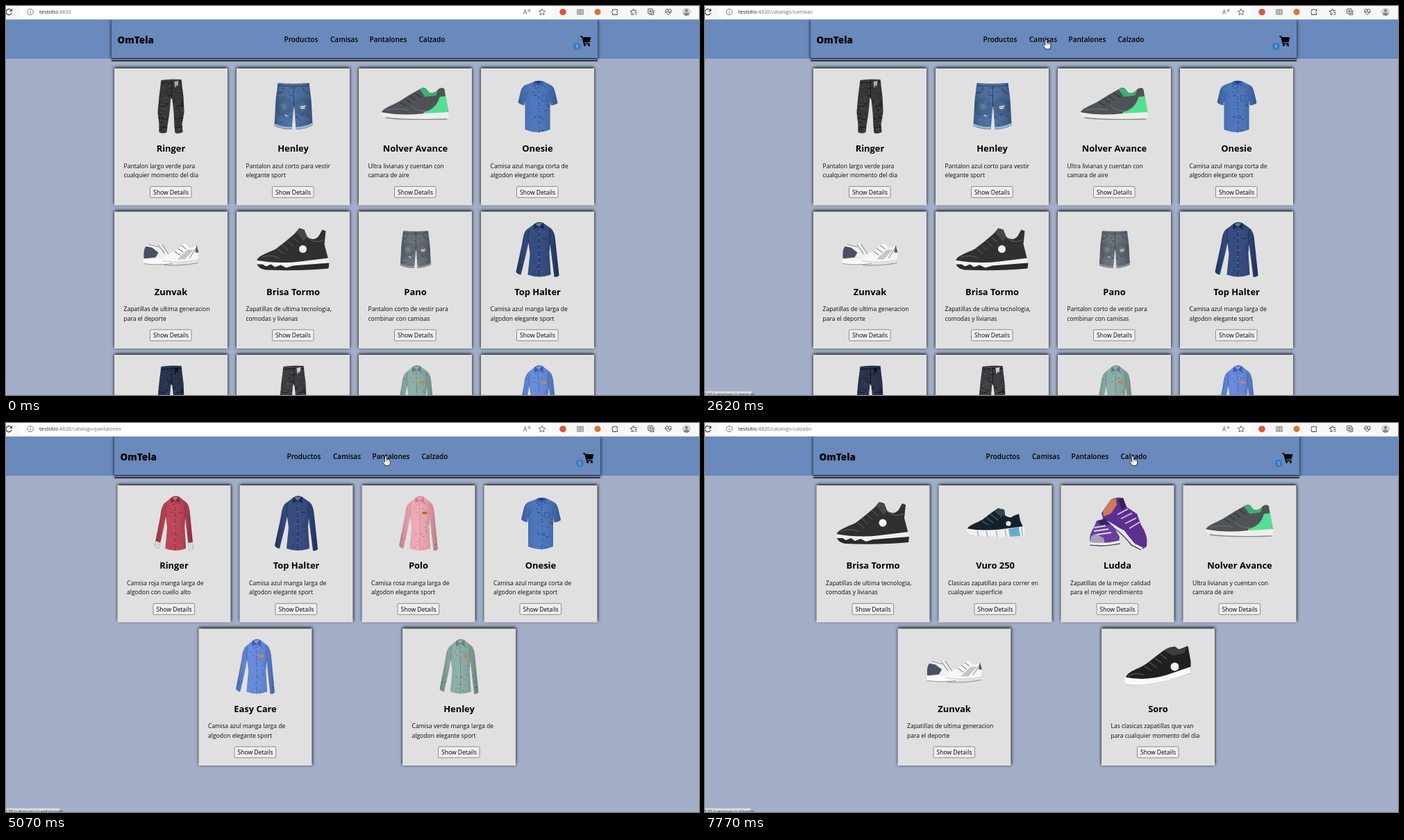
An HTML page with a canvas for the animation above (8 s loop, 998 by 561 pixels).

```html
<!DOCTYPE html>
<html lang="es">
<head>
<meta charset="utf-8">
<style>
html, body { margin: 0; width: 100%; height: 100%; overflow: hidden; background: #a3afc8; }
canvas { display: block; width: 998px; height: 561px; }
</style>
</head>
<body>
<canvas id="stage"></canvas>
<script>
const W = 998, H = 561, LOOP = 8000;
const dpr = window.devicePixelRatio || 1;
const SANS = '"Open Sans", "Noto Sans", sans-serif';
const BODY = `8.55px ${SANS}`, TITLE = `bold 12.9px ${SANS}`, URLFONT = `7.3px ${SANS}`;
const stage = document.getElementById('stage');
let g;

function prepare(canvas) {
  canvas.width = W * dpr;
  canvas.height = H * dpr;
  const c = canvas.getContext('2d');
  c.scale(dpr, dpr);
  return c;
}

function text(s, x, y, font, color = '#0b0b0b', align = 'left') {
  g.font = font;
  g.fillStyle = color;
  g.textAlign = align;
  g.fillText(s, x, y);
  return g.measureText(s).width;
}

function rect(x, y, w, h, color) {
  g.fillStyle = color;
  g.fillRect(x, y, w, h);
}

function fill(d, color) {
  g.fillStyle = color;
  g.fill(new Path2D(d));
}

function line(d, color, width = 1) {
  g.strokeStyle = color;
  g.lineWidth = width;
  g.stroke(new Path2D(d));
}

function dot(x, y, r, color) {
  g.fillStyle = color;
  g.beginPath();
  g.arc(x, y, r, 0, 7);
  g.fill();
}

function at(x, y, draw, sx = 1, sy = sx) {
  g.save();
  g.translate(x, y);
  g.scale(sx, sy);
  draw();
  g.restore();
}

function glow(x, y, r, color) {
  const soft = g.createRadialGradient(x, y, 0, x, y, r);
  soft.addColorStop(0, color);
  soft.addColorStop(1, 'transparent');
  rect(x - r, y - r, 2 * r, 2 * r, soft);
}

// Cloth: base colour, seeded light and dark flecks and a soft side shadow, clipped to the outline.
function cloth(d, base, fleck, count = 90, size = 3) {
  let seed = 7;
  const rnd = () => (seed = (seed * 16807) % 2147483647) / 2147483647;
  fill(d, base);
  g.save();
  g.clip(new Path2D(d));
  g.globalAlpha = 0.35;
  for (let i = 0; i < count; i++) {
    const color = i % 3 ? fleck : '#000';
    rect(rnd() * 68 - 34, rnd() * 82 - 41, size * (0.4 + rnd()), size * 0.5, color);
  }
  g.globalAlpha = 1;
  const shade = g.createLinearGradient(-30, 0, 30, 0);
  shade.addColorStop(0, 'rgba(0,0,0,.22)');
  shade.addColorStop(0.45, 'rgba(255,255,255,.07)');
  shade.addColorStop(1, 'rgba(0,0,0,.25)');
  rect(-40, -45, 80, 90, shade);
  g.restore();
}

const PANTS = 'M-14-38Q0-40 15-39L18-14 19 8 16 26 17 37Q11 40 6 38L5 28 4 8 2-10 0-13-2 8-5 28-6 37Q-11 40-17 37L-17 26-19 8-17-14Z';
const SHORTS = 'M-22-34Q0-32 23-34L26-10 28 27Q17 33 4 33L2 4 1 0-2 33Q-16 33-27 28L-25-10Z';
const TEE = 'M-7-35Q0-39 9-36L17-32Q23-30 25-22L29-5Q24-1 19-2L18-9 18 33Q0 41-18 33L-18-9-19-2Q-24-2-28-6L-24-23Q-22-30-15-32Z';
const SHIRT = 'M-5-37Q2-42 9-38L19-31Q25-27 26-10L31 37Q28 40 24 39L18-8 17 5 19 36Q2 42-14 36L-11 6-13-10-17 8-24 36Q-28 36-31 32L-22-10Q-20-28-13-31Z';

const pants = (base, fleck, tag = '#a9abb0') => () => {
  cloth(PANTS, base, fleck, 260, 4);
  line('M-15-34Q0-36 16-35M1-36 1-12M-18-2-8 0M8 0 18-2M-18 16-6 19M5 19 18 16M-17 29-5 31M6 31 17 29', 'rgba(0,0,0,.55)', 1);
  fill('M5-36 11-37 10-29 8-31 6-26Z', tag);
};

const shorts = (base, fade, cuff, tag, s = 1) => () => at(0, 0, () => {
  cloth(SHORTS, base, fade, 130, 3);
  g.save();
  g.clip(new Path2D(SHORTS));
  g.globalAlpha = 0.6;
  glow(-13, 0, 15, fade);
  glow(14, 0, 15, fade);
  g.restore();
  line('M-27 26Q-16 31-2 31M4 31Q17 31 28 25', cuff, 3);
  line('M-22-30Q0-28 23-30M1-29V0M-23-20Q-14-18-13-28M24-20Q16-18 14-28', 'rgba(15,25,50,.55)', 1);
  line('M10 1 18-1M11 3 17 2M-12 12-8 14', '#dde4ee', 1.3);
  fill('M-2-33H3V-30H-2Z', tag);
}, s);

function placket(color) {
  line('M1-32Q3 0 2 38', color, 0.9);
  for (let y = -26; y < 36; y += 9) dot(2, y, 0.6, '#d9dde8');
}

const tee = () => {
  cloth(TEE, '#3f6cba', '#5784cd', 90);
  placket('#2d539b');
  fill('M-7-35Q0-39 9-36L8-28 1-32-6-28Z', '#3562ad');
  fill('M-4-36Q1-38 6-36L1-32Z', '#233f78');
  line('M-18-8-15-22M18-8 16-22M6-16H13V-8H6Z', '#2f569d', 0.8);
};

const shirt = (base, fleck, dark, { cuff, label, w = 0.9 } = {}) => () => at(0, 0, () => {
  cloth(SHIRT, base, fleck, 150, 2);
  line('M-13-10Q-15-22-12-29M18-8Q17-22 18-29M7-16H14', dark, 0.9);
  placket(dark);
  fill('M-5-37Q2-42 9-38L9-29 2-33-5-29Z', dark);
  fill('M-3-37Q2-40 7-38L2-33Z', 'rgba(235,235,245,.4)');
  if (cuff) fill('M-29 25-22 28-24 36Q-28 36-31 32ZM22 28 30 27 31 37Q28 40 24 39Z', cuff);
  if (label) rect(6, -17, 8, 3.5, label);
}, w, 1);

const runner = () => {
  fill('M-49 9C-47 2-34-1-24-7L-8-17 8-26Q13-29 16-25L20-20Q28-18 33-25 39-29 42-25L44-12 48 9 0 15Z', '#4f5357');
  fill('M12 8Q30 4 35-14L44-15 48 10 12 12Z', '#55df92');
  fill('M6-25Q12-29 16-25L20-20Q28-18 33-25L30-16 14-14Z', '#3fae78');
  line('M-22-6-13-1M-15-11-6-5M-8-15 1-9M-1-20 9-13', '#2f3438', 1.3);
  line('M-42 5Q-22 2-10 5M-6-2Q2 8 16 6', '#73777b', 1);
  fill('M-50 8Q-20 14 12 10L48 8Q49 14 46 18 10 20-38 18-48 15-50 8Z', '#eeeeec');
  line('M-43 16Q-15 20 46 18', '#85888a', 1.3);
};

const highTop = () => {
  fill('M-53 17C-51 8-37 5-25-1L-11-12 2-23 9-31 16-29 20-19Q30-11 37-20L42-29 47-27 45-8 51 15 0 22Z', '#303033');
  fill('M4-25 9-31 16-29 20-19 16-12Z', '#47474b');
  line('M-22-1-13 6M-16-7-7 1M-9-13 0-5M-2-19 8-11M-46 11Q-32 6-20 12M20-18Q30-8 44-14', '#626267', 1);
  dot(14, -1, 5.5, '#f2f2f2');
  fill('M-54 15Q-20 21 10 17L51 12 52 21Q10 28-44 24-54 21-54 15Z', '#f0f0f0');
  fill('M-52 21-44 21-39 24-32 21-26 25-18 22-10 26 0 23 52 19 51 27Q10 31-40 29-50 27-52 21Z', '#2a2a2c');
};

const pairLow = () => {
  fill('M-39 16C-40 0-37-9-32-9L-22-7-15-10-10-5 3 9 3 18Z', '#efefef');
  fill('M-39 13Q-40 0-36-5L-27-3-18 4-22 11Z', '#4b5061');
  line('M-19-8-9 6M-13-8-2 8M-33-8-18-4', '#858994', 1.2);
  fill('M-40 13 3 14 2 20Q-22 23-39 20Z', '#fafafa');
  line('M-39 20Q-20 23 2 20', '#90939a', 1);
  fill('M-12 16C-11 8 4 3 12-3L20-9 25-4Q32-1 37-7L40 4 38 17-8 20Z', '#f7f7f7');
  fill('M9 14 24 0 33 0 20 14Z', '#c3c5ca');
  line('M5 2 13 8M10-2 18 4M15-6 22-1M27 12 36-2', '#888b95', 1.1);
  fill('M37-7 40 4 35 4Z', '#565a66');
  line('M-12 16Q10 20 39 15', '#c2c4c8', 1);
  line('M-10 22Q14 24 39 19', '#8d9097', 1.1);
};

const trainer = () => {
  fill('M-41 9C-39 2-28 0-18-6L-5-16 4-22 13-20 14-12Q21-6 26-11L34-14 36-4 41 7 0 13Z', '#17212c');
  line('M-19-4-9 3M-13-9-3-1M-7-14 4-5M0-18 9-10', '#3b6170', 1.4);
  fill('M4-22 13-20 14-12 9-11 0-18Z', '#30454f');
  dot(19, 0, 3.6, '#e9edf0');
  fill('M-42 7Q-15 12 18 7L41 4 43 16 30 19Q-8 20-34 16-42 14-42 7Z', '#f0f0f0');
  fill('M19 8 34 5 36 18 21 19Z', '#6aa9cf');
  line('M-26 10-24 18M-13 11-11 19M1 10 3 19M14 9 16 19M38 6 39 17', '#a3abb5', 1.4);
};

const purplePair = () => {
  fill('M-23-15-10-34Q-2-39 8-37L13-24 28-14 34 2Q45 18 42 33L36 37 24 30 10 10-6 2-20-4Z', '#5c2f8f');
  fill('M-21-17-10-34-2-36-1-27-9-15-20-10Z', '#cf7a59');
  fill('M1-34 8-37 13-24 6-19Z', '#372058');
  line('M0-13 15-21M5-7 21-15M11 0 27-8M17 7 32-2', '#d8c7ea', 1.8);
  line('M-19-4Q6 6 24 30L36 36', '#ece8f2', 2.6);
  line('M-14 2Q2 8 20 31L34 38', '#37264e', 1.3);
  fill('M-40 28Q-41 14-34 6L-30-4-19-7-6 4 3 19 2 28-30 31Z', '#66409b');
  fill('M-40 27Q-39 16-31 15L-20 21-18 29Z', '#a79dbd');
  fill('M-29-3-19-7-10 1-22 4Z', '#3b2460');
  line('M-33 6-17 3M-34 11-13 8M-30 16-9 13', '#e1d9ee', 1.8);
  line('M-40 28Q-22 32 3 26', '#f0eff3', 3);
  line('M-40 31Q-20 34 4 29', '#37264e', 1.2);
};

const lowSneaker = () => {
  fill('M-47 18C-46 6-28 4-16-5L2-19Q14-29 24-29L30-25 43-30 47-8 47 6-10 22Z', '#202022');
  fill('M8-23Q16-29 24-29L30-25 41-28 38-20 22-16Z', '#3e3e42');
  line('M-20-1-9 6M-13-7-2 1M-6-13 6-5M2-19 13-11M-43 14Q-32 7-21 12', '#56565b', 1.2);
  dot(24, 0, 6, '#f4f4f4');
  fill('M-48 15Q-18 21 12 12L47 0 47 9Q26 19-2 25-25 29-45 26-49 22-48 15Z', '#fafafa');
  line('M-46 26Q-5 30 47 9', '#bdbdbd', 0.9);
};

const algodon = 'algodon elegante sport', vestir = 'combinar con camisas';
const blueTee = ['Onesie', 'Camisa azul manga corta de', algodon, tee];
const navyShirt = ['Top Halter', 'Camisa azul manga larga de', algodon, shirt('#263f78', '#36528f', '#172b59', { w: 1 })];
const redShirt = ['Ringer', 'Camisa roja manga larga de', 'algodon con cuello alto', shirt('#b9384c', '#d66a78', '#8e2639', { cuff: '#cfd9ea' })];
const pinkShirt = ['Polo', 'Camisa rosa manga larga de', algodon, shirt('#f0a4b1', '#f8c6cf', '#d87f91', { label: '#b5683f' })];
const blueShirt = ['Easy Care', 'Camisa azul manga larga de', algodon, shirt('#5c84dc', '#86a5e9', '#3b5db2', { label: '#c98a50' })];
const greenShirt = ['Henley', 'Camisa verde manga larga de', algodon, shirt('#87a9a3', '#adc5c0', '#5f837e', { label: '#bd8650' })];
const greenPants = ['Ringer', 'Pantalon largo verde para', 'cualquier momento del dia', pants('#252724', '#4a4d47')];
const cargoPants = ['Onesie', 'Pantalon cargo largo con varios', 'bolsillos', pants('#2c2c31', '#5b5b62', '#c9c9cc')];
const stretchPants = ['Easy Care', 'Pantalon largo elastizados para', 'mayor comodidad', pants('#343540', '#5b5c6a', '#c2c3ca')];
const navyPants = ['Top Halter', 'Pantalon azul largo de tela', 'organica y elastizado', pants('#17223f', '#2b3c66', '#10131c')];
const blueShorts = ['Henley', 'Pantalon azul corto para vestir', 'elegante sport', shorts('#3f659b', '#7399c6', '#a3b8d2', '#8a5a3c')];
const greyShorts = tone => ['Pano', 'Pantalon corto de vestir para', vestir, shorts(tone, '#a0a4ad', '#8c919b', '#9c3b38', 0.8)];
const greenRunner = ['Nolver Avance', 'Ultra livianas y cuentan con', 'camara de aire', runner];
const whitePair = ['Zunvak', 'Zapatillas de ultima generacion', 'para el deporte', pairLow];
const blackHigh = ['Brisa Tormo', 'Zapatillas de ultima tecnologia,', 'comodas y livianas', highTop];

const catalogue = [
  [greenPants, blueShorts, greenRunner, blueTee, whitePair, blackHigh, greyShorts('#5f6772'), navyShirt,
    navyPants, cargoPants, greenShirt, blueShirt],
  [redShirt, navyShirt, pinkShirt, blueTee, blueShirt, greenShirt],
  [cargoPants, blueShorts, greyShorts('#757783'), navyPants, stretchPants, greenPants],
  [blackHigh, ['Vuro 250', 'Clasicas zapatillas para correr en', 'cualquier superficie', trainer],
    ['Ludda', 'Zapatillas de la mejor calidad', 'para el mejor rendimiento', purplePair], greenRunner, whitePair,
    ['Soro', 'Las clasicas zapatillas que van', 'para cualquier momento del dia', lowSneaker]]
];

const links = [['Productos', 400.5, 50], ['Camisas', 467, 40], ['Pantalones', 523.5, 54], ['Calzado', 594.5, 39]];

function shadowBox(x, y, w, h, color, blur, dy) {
  g.save();
  g.shadowColor = '#000';
  g.shadowBlur = blur * dpr;
  g.shadowOffsetY = dy * dpr;
  rect(x, y, w, h, color);
  g.restore();
}

function card(x, y, [name, first, second, draw]) {
  const mid = x + 81.5;
  shadowBox(x, y, 163, 197.5, '#e0e0e0', 4.5, -1.4);
  at(mid, y + 55, draw);
  text(name, mid, y + 120.3, TITLE, '#000', 'center');
  text(first, x + 13.5, y + 143.8, BODY);
  text(second, x + 13.5, y + 157.3, BODY);
  g.beginPath();
  g.roundRect(x + 51.5, y + 170.3, 59.6, 16, 1.5);
  g.fillStyle = '#efefef';
  g.fill();
  g.strokeStyle = '#757575';
  g.lineWidth = 0.8;
  g.stroke();
  text('Show Details', mid, y + 181.6, BODY, '#000', 'center');
}

function header(dx) {
  rect(0, 19, W, 57, '#6a89bc');
  shadowBox(152 + dx, 18, 700, 57.5, '#6a89bc', 4.5, 0.5);
  rect(152 + dx, 75.4, 700, 1.2, '#161a24');
  rect(152 + dx, 76.6, 700, 1.6, '#8694b2');
  rect(152 + dx, 78.2, 700, 1.4, '#0b0d12');
  text('OmTela', 160.5 + dx, 53.6, `800 13.5px ${SANS}`, '#000');
  for (const [label, x] of links) text(label, x + dx, 52, `600 10px ${SANS}`, '#000');
  at(834.5 + dx, 50.5, () => {
    line('M-7.5-6.5H-4.8L-2 4H6', '#000', 1.5);
    fill('M-4.4-5.5H8L6 2H-2.6Z', '#000');
    dot(-1, 6, 1.5, '#000');
    dot(5, 6, 1.5, '#000');
  });
  dot(822.3 + dx, 58, 5.6, '#3a7bc4');
  text('1', 822.3 + dx, 60.6, `7px ${SANS}`, '#fff', 'center');
}

function toolbar() {
  const ink = '#444';
  const star = 'M0-4.5 1.4-1.5 4.6-1.1 2.2 1.1 2.9 4.4 0 2.8-2.9 4.4-2.2 1.1-4.6-1.1-1.4-1.5Z';
  rect(0, 0, W, 19.4, '#f7f7f8');
  g.beginPath();
  g.roundRect(20, -8, 767, 25.5, 9);
  g.fillStyle = '#fff';
  g.fill();
  at(4, 8.5, () => line('M4-1.5A4.2 4.2 0 1 0 4.1 1.5M4.3-4.5V-1.3H1.2', '#333', 1.1));
  at(35, 8.5, () => line('M4.2 0A4.2 4.2 0 1 1-4.2 0 4.2 4.2 0 1 1 4.2 0M0-.8V2.4M0-2.6V-1.7', '#666', 0.9));
  text('A', 745, 11.5, `8.5px ${SANS}`, '#555');
  at(752, 7, () => line('M0-2Q1.2-.5 0 1M1.6-3Q3.6-.5 1.6 2', '#555', 0.8));
  at(772, 8.5, () => line(star, '#555', 0.9));
  dot(802, 8.7, 4.8, '#dc5640');
  at(827, 8.5, () => {
    fill('M-4.5-3.5H4.5V3.8H-4.5Z', '#bcbcbc');
    line('M0-3.5V4M-4.5-3.5H4.5V3.8H-4.5Z', '#8e8e8e', 0.8);
  });
  dot(852, 8.5, 4.5, '#d9772f');
  at(877, 8.5, () => line('M-3.5-3H-1Q0-5.5 1-3H3.5V-.8Q.8 0 3.5 1.5V4H-3.5V1.5Q-5.5 0-3.5-1Z', ink, 1));
  at(903.5, 8.5, () => line('M1 3-2.6 4.2-2 1-4.6-1.1-1.4-1.5 0-4.5 1.4-1.5H5M2 1H5M2.5 3.5H5', ink, 1));
  at(929, 8.5, () => line('M-4.3-4.3H2V2H-4.3ZM3.8-2.4V4H-2.4M-1.1-3V.8M-3-1.1H.8', ink, 0.9));
  at(954, 8.5, () => {
    line('M0 4.3-4.2 0Q-5-3.5-2-4 0-4 0-2.2 1-4.4 3.3-3.7 5-2.2 3.8.3ZM-4-.3H-1.5L-.5-2 1 1.5 2 0H4', ink, 0.9);
  });
  dot(980, 8.6, 6, '#d2d2d4');
  dot(980, 6.7, 2.1, '#858589');
  fill('M976 12.6Q976 9.6 980 9.6T984 12.6Q980 15.4 976 12.6Z', '#858589');
}

function renderPage(items, index) {
  const canvas = document.createElement('canvas');
  g = prepare(canvas);
  rect(0, 0, W, H, '#a3afc8');
  header(index ? 4 : 0);
  items.forEach((item, i) => {
    const row = Math.floor(i / 4);
    const x = !index ? 156 + (i % 4) * 176 : row ? 277.5 + (i - 4) * 293.5 : 160.5 + i * 176;
    card(x, 90 + row * 206.5, item);
  });
  toolbar();
  return canvas;
}

const pages = catalogue.map(renderPage);
const ctx = prepare(stage);

// Each entry: start time and value.
const pageAt = [[0, 0], [3150, 1], [5550, 2], [7770, 3]];
const pathAt = [[0, ''], [2560, '/catalogo/camisas'], [4930, '/catalogo/pantalones'], [7170, '/catalogo/calzado']];
const hintAt = [[0, ''], [1750, 'camisas'], [4340, 'pantalones'], [6840, 'calzado']];
const hintWidth = { camisas: 67, pantalones: 77, calzado: 66 };
const pointer = [
  [460, 903, 508], [800, 705, 300], [1080, 470, 90], [1220, 373, 69], [1290, 400, 64],
  [1490, 480, 49], [1620, 491.8, 44.7], [1750, 491.8, 44.7], [1960, 491.2, 48.6],
  [4070, 491.2, 48.6], [4470, 546.8, 47.9], [6550, 546.8, 47.9], [6970, 616, 47.9], [LOOP, 616, 47.9]
];

const current = (track, t) => track.filter(k => k[0] <= t).pop()[1];

function pointerPos(t) {
  const i = pointer.findIndex(k => k[0] > t);
  const [t0, x0, y0] = pointer[i - 1], [t1, x1, y1] = pointer[i];
  const u = (t - t0) / (t1 - t0);
  const e = t > 4000 ? u * u * (3 - 2 * u) : u;
  return [x0 + (x1 - x0) * e, y0 + (y1 - y0) * e];
}

function drawPointer(t, dx) {
  if (t < 460) return;
  const [x, y] = pointerPos(t);
  const hand = y > 40 && y < 56 && links.some(([, lx, w]) => x > lx + dx && x < lx + dx + w);
  const d = hand
    ? 'M-1.3 7V1.2C-1.3-.5 1.2-.5 1.2 1.2V4.6C3.2 4 6.4 5 6.6 6.6V9.4C6.6 11 5.5 12 5.3 13.4H-.8C-1.2 11.4-4.4 9.2-4.5 7.7-4.2 6.4-2.4 6.7-1.3 8.4Z'
    : 'M0 0V11L2.6 8.7 4.3 12.5 6 11.8 4.4 8.1H7.8Z';
  at(x, y, () => {
    fill(d, '#fff');
    line(d, '#111', 0.8);
    if (hand) line('M1.2 5V8M3 5.2V8M4.8 5.6V8.2', '#333', 0.5);
  });
}

function drawHint(t) {
  const hint = current(hintAt, t);
  if (!hint) return;
  g.globalAlpha = Math.min(1, (t - 1750 + 70) / 280);
  rect(0, 555, hintWidth[hint], 6, '#d9dce1');
  rect(0, 555, hintWidth[hint], 0.6, '#a4a9b2');
  text('820/catalogo/' + hint, -2, 563.2, URLFONT, '#222');
  g.globalAlpha = 1;
}

function frame(now) {
  const t = now % LOOP;
  const page = current(pageAt, t);
  g = ctx;
  g.drawImage(pages[page], 0, 0, W, H);
  const hostWidth = text('testsitio', 48, 11.2, URLFONT, '#1c1c1c');
  text(':4820' + current(pathAt, t), 48 + hostWidth, 11.2, URLFONT, '#6c6c6c');
  drawHint(t);
  drawPointer(t, page ? 4 : 0);
}

const start = performance.now();
function tick() {
  frame(performance.now() - start);
  requestAnimationFrame(tick);
}
tick();
</script>
</body>
</html>
```
